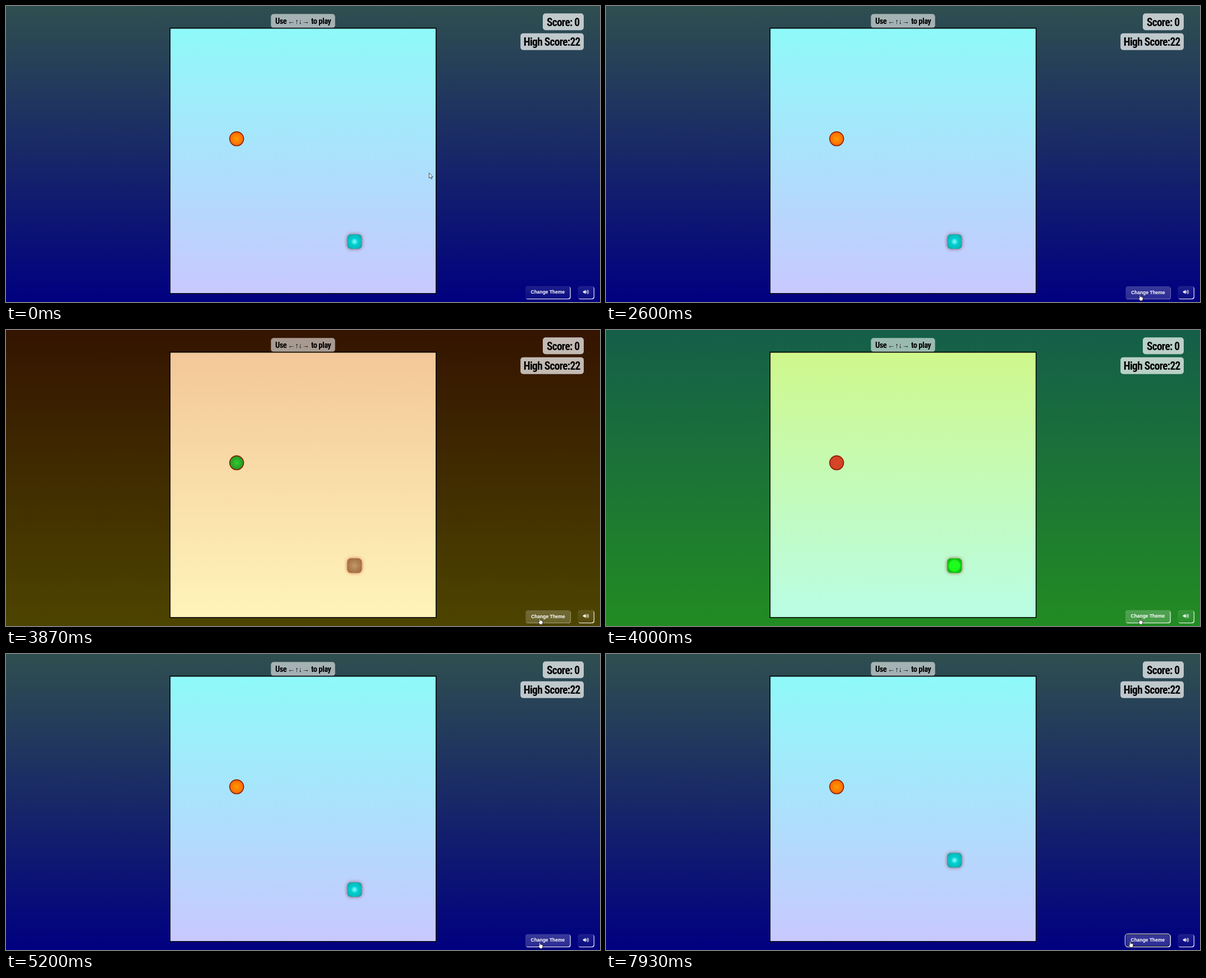
An HTML page with a canvas for the animation above (8 s loop, 1059 by 529 pixels).

```html
<!DOCTYPE html>
<html lang="en">
<head>
<meta charset="utf-8">
<title>Snake themes</title>
<style>
html, body { margin: 0; width: 100%; height: 100%; overflow: hidden; }
canvas, svg { position: absolute; left: 0; top: 0; display: block; }
.label { font: bold 19.5px "Roboto Condensed", Roboto, "Open Sans", sans-serif; font-stretch: 75%; letter-spacing: -.75px; text-anchor: middle; }
.hint { font-size: 14.5px; letter-spacing: -.5px; text-anchor: start; }
.arrows { font: 12.7px "Liberation Serif", serif; }
.button { font: bold 8.45px "Liberation Sans", Arial, sans-serif; fill: #fff; }
.cursor { fill: #fff; stroke: #111; stroke-width: .75; stroke-linejoin: round; }
</style>
</head>
<body>
<canvas id="stage" width="1059" height="529"></canvas>
<svg width="1059" height="529" viewBox="0 0 1059 529">
  <text class="label hint" x="480" y="32">Use</text>
  <text class="arrows" x="502.5" y="32">←↑↓→</text>
  <text class="label hint" x="544" y="32">to play</text>
  <text class="label" x="993.2" y="36">Score: 0</text>
  <text class="label" x="973.2" y="71">High Score:22</text>
  <text class="button" id="caption" x="935.6" y="514.2">Change Theme</text>
  <path fill="#fff" d="M1028.8 509.6h2.1l2.6-2.3v7.6l-2.6-2.3h-2.1z"/>
  <path fill="none" stroke="#fff" stroke-width=".9" d="M1034.5 509.6q1.3 1.5 0 3M1035.7 508.3q2.4 2.8 0 5.6M1036.9 507q3.5 4.1 0 8.2"/>
  <path class="cursor" id="arrow" d="M0 0V9.3L2.2 7.3 3.7 10.6 5.2 10 3.8 6.8H6.6Z"/>
  <path class="cursor" id="hand" d="M-.9 .9Q0 -.3 .8 .9V4Q3.2 3.9 5 5.1Q5.8 6 5.1 8.6L4.3 11.2H.3L-2.5 7.5Q-3 6 -1.9 6.1L-.9 6.9Z"/>
</svg>
<script>
const LOOP = 8000, FPS = 15;
const ctx = document.getElementById('stage').getContext('2d');
const [caption, arrow, hand] = ['caption', 'arrow', 'hand'].map(id => document.getElementById(id));

const BOARD = { x: 293, y: 40.3, size: 472.8 };
const CELL = BOARD.size / 18;

// Gradient stops: page, board, food and snake run from start to end or centre to edge.
const THEMES = {
  ocean: {
    page: ['#2f4f4f', '#000080'], board: ['#8ffaf9', '#c8c8ff'],
    food: ['#ff9a00', '#ff6600'], rim: '#8b1a00',
    snake: [[0, '#8ffcfc'], [.22, '#3fe4e4'], [.36, '#00ced1'], [.7, '#0abdbd'], [1, '#20908f']],
    glow: 'rgba(150,40,60,.75)'
  },
  desert: {
    page: ['#341400', '#4d4400'], board: ['#f3c799', '#fff4ba'],
    food: ['#32cd32', '#229322'], rim: '#8b1a00',
    snake: [[0, '#c19a6b'], [.5, '#ae7f50'], [1, '#a0663b']],
    glow: 'rgba(200,80,30,.75)'
  },
  forest: {
    page: ['#155e49', '#228b22'], board: ['#cff88c', '#b9fde4'],
    food: ['#d84628', '#d04224'], rim: '#8b1500',
    snake: [[0, '#1eff1e'], [.56, '#1cfb1c'], [.62, '#10d412'], [.8, '#12bd17'], [1, '#267d22']],
    glow: 'rgba(150,50,20,.75)'
  }
};

// Pointer hot spot: time, x, y
const PATH = [
  [0, 754.4, 298.4], [600, 754.4, 298.4], [800, 812, 335], [1000, 930, 411],
  [1200, 1026, 474], [1330, 1018, 493], [1470, 987, 499.5], [1530, 979, 506],
  [1670, 957, 514], [1800, 952, 515.6], [2600, 952, 515.6], [2667, 951.6, 515],
  [5600, 951.6, 515], [6070, 943, 514.6], [6270, 943, 514.6], [6930, 936, 514.2],
  [7267, 936, 514.2], [7730, 934.6, 513.2], [8000, 934.6, 513.2]
];

function pointerAt(t) {
  const i = Math.max(1, PATH.findIndex(p => p[0] >= t));
  const [t0, x0, y0] = PATH[i - 1], [t1, x1, y1] = PATH[i];
  const k = (t - t0) / (t1 - t0);
  return [x0 + (x1 - x0) * k, y0 + (y1 - y0) * k];
}

const within = (t, from, to) => t >= from && t < to;

function themeAt(t) {
  if (within(t, 2660, 3990)) return THEMES.desert;
  if (within(t, 3990, 5190)) return THEMES.forest;
  return THEMES.ocean;
}

function roundRect(x, y, w, h, r) {
  ctx.beginPath();
  ctx.roundRect(x, y, w, h, r);
}

function vertical(y0, y1, [top, bottom]) {
  const g = ctx.createLinearGradient(0, y0, 0, y1);
  g.addColorStop(0, top);
  g.addColorStop(1, bottom);
  return g;
}

function radial(x, y, r, stops) {
  const g = ctx.createRadialGradient(x, y, 0, x, y, r);
  stops.forEach(([at, color]) => g.addColorStop(at, color));
  return g;
}

const centre = (col, row) => [BOARD.x + (col + .5) * CELL, BOARD.y + (row + .5) * CELL];

function drawBoard(colors) {
  const { x, y, size } = BOARD;
  ctx.fillStyle = '#000';
  ctx.fillRect(x - 1.3, y - 1.5, size + 2.9, size + 3);
  ctx.fillStyle = vertical(y, y + size, colors);
  ctx.fillRect(x + .2, y + .2, size, size - .2);
}

function drawFood(theme) {
  const [x, y] = centre(4, 7);
  ctx.beginPath();
  ctx.arc(x, y, 12.4, 0, Math.PI * 2);
  ctx.fillStyle = radial(x, y, 13, [[0, theme.food[0]], [1, theme.food[1]]]);
  ctx.fill();
  ctx.strokeStyle = theme.rim;
  ctx.lineWidth = 1.6;
  ctx.stroke();
}

function drawSnake(theme, row) {
  const [x, y] = centre(12, row), half = CELL / 2;
  roundRect(x - half, y - half, CELL, CELL, 7);
  ctx.save();
  ctx.shadowColor = theme.glow;
  ctx.shadowBlur = 6;
  ctx.fillStyle = radial(x, y, 17, theme.snake);
  ctx.fill();
  ctx.restore();
}

function drawLabel(x, y, w, h, alpha) {
  roundRect(x, y, w, h, 5);
  ctx.fillStyle = `rgba(255,255,255,${alpha})`;
  ctx.fill();
}

function drawButton(x, y, w, h, { hover, pressed, focus }) {
  const shift = pressed ? .6 : 0, edge = pressed ? .4 : .9;
  x += shift;
  y += shift;
  // The bright edge shows only outside the face.
  ctx.save();
  ctx.beginPath();
  ctx.rect(x - 6, y - 6, w + 12, h + 12);
  ctx.roundRect(x, y, w, h, 4);
  ctx.clip('evenodd');
  roundRect(x + edge, y + edge, w, h, 4);
  ctx.fillStyle = `rgba(255,255,255,${pressed ? .6 : .95})`;
  ctx.shadowColor = 'rgba(255,255,255,.6)';
  ctx.shadowBlur = 1;
  ctx.fill();
  ctx.restore();

  roundRect(x, y, w, h, 4);
  ctx.fillStyle = hover
    ? vertical(y, y + h, ['rgba(255,255,255,.21)', 'rgba(255,255,255,.17)'])
    : vertical(y, y + h, ['rgba(255,255,255,.11)', 'rgba(255,255,255,.04)']);
  ctx.fill();

  if (focus) {
    ctx.lineWidth = 1;
    ctx.strokeStyle = '#101010';
    roundRect(x + .5, y + .5, w - 1, h - 1, 4);
    ctx.stroke();
    ctx.strokeStyle = '#fff';
    roundRect(x - .5, y - .5, w + 1, h + 1, 5);
    ctx.stroke();
  }
}

function drawPointer(t, overButton) {
  const [x, y] = pointerAt(t);
  arrow.style.display = overButton ? 'none' : '';
  hand.style.display = overButton ? '' : 'none';
  (overButton ? hand : arrow).setAttribute('transform', `translate(${x} ${y})`);
}

function draw(t) {
  const theme = themeAt(t);
  const hover = t >= 1525;
  const pressed = within(t, 2590, 2660) || within(t, 3860, 3990) || within(t, 5125, 5190);
  const row = t >= 7925 ? 12 : t >= 7725 ? 13 : 14;

  ctx.fillStyle = vertical(0, 529, theme.page);
  ctx.fillRect(0, 0, 1059, 529);
  drawLabel(472.3, 14.2, 114.4, 25, .57);
  drawLabel(957, 13.2, 73, 30, .7);
  drawLabel(917.2, 48.7, 112.8, 30, .7);
  drawBoard(theme.board);
  drawFood(theme);
  drawSnake(theme, row);
  drawButton(926, 500.7, 79.6, 22.3, { hover, pressed, focus: t >= 7590 });
  drawButton(1019.6, 500.7, 28.2, 22.3, {});
  caption.setAttribute('transform', pressed ? 'translate(.6 .6)' : '');
  drawPointer(t, hover);
}

const start = performance.now();

function tick() {
  const t = (performance.now() - start) % LOOP;
  draw(Math.floor((t + 4) * FPS / 1000) * 1000 / FPS % LOOP);
  requestAnimationFrame(tick);
}
tick();
</script>
</body>
</html>
```
